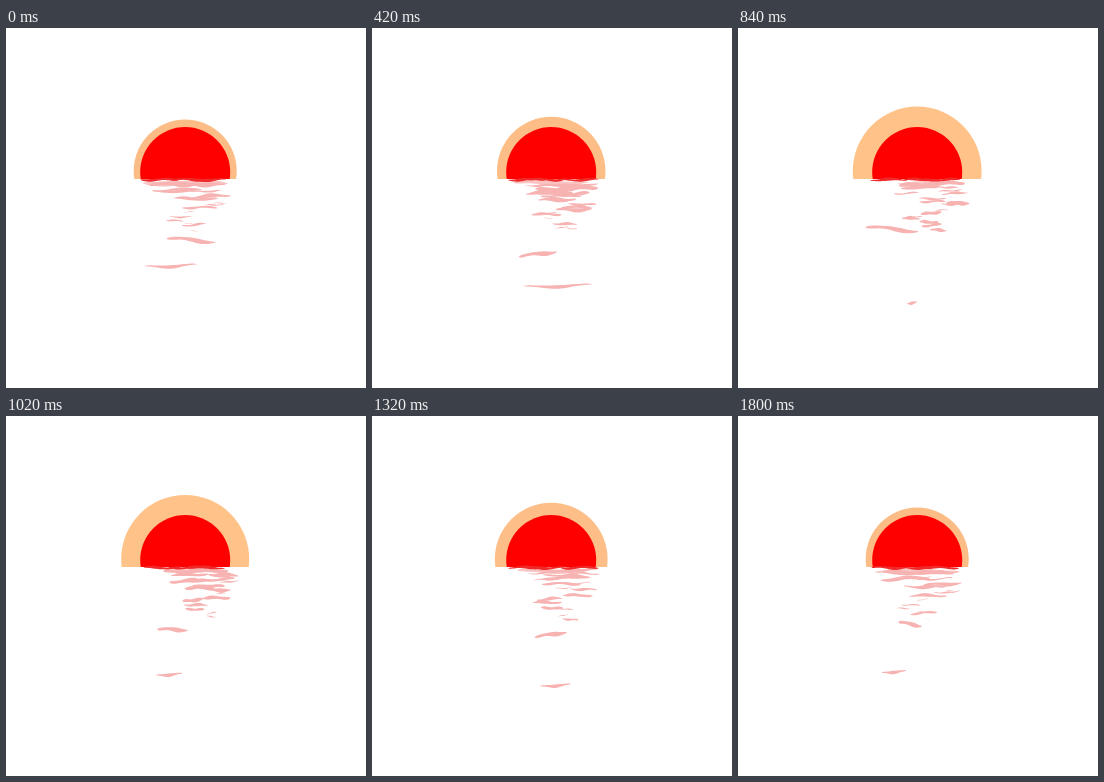
An HTML page with a canvas for the animation above (1830 ms loop, 360 by 360 pixels).

```html
<!DOCTYPE html>
<html lang="en">
<head>
<meta charset="utf-8">
<title>Sunset on water</title>
<style>
  html, body { margin: 0; width: 100%; height: 100%; overflow: hidden; background: #fff; }
  canvas { display: block; width: 360px; height: 360px; }
</style>
</head>
<body>
<canvas id="stage" width="360" height="360"></canvas>
<script>
const ctx = document.getElementById('stage').getContext('2d');
const LOOP = 1830, STEP = 30, TAU = Math.PI * 2;
const CX = 179.2, HORIZON = 151;
const PINK = '#f6b3b2', PALE = '#f9c3c2', RIPPLE = '#ee2a2a';
const RIPPLES = 18;

// Two stray glints wander over the open water: centre x, y, length
const times = [0, 180, 420, 840, 1170, 1500, 1800];
const far = [[185, 212, 50], [188, 203, 66], [166, 226, 39], [154, 201, 54],
  [177, 224, 12], [181, 212, 58], [172, 208, 24]];
const near = [[165, 238, 53], [152, 231, 38], [186, 258, 70], [174, 275, 10],
  [154, 245, 41], [219, 299, 19], [156, 256, 25]];

const lerp = (a, b, k) => a + (b - a) * k;
const rand = n => {
  const v = Math.sin(n * 127.1 + 4.7) * 43758.5453;
  return v - Math.floor(v);
};

function along(path, t) {
  let i = 0;
  while (i < times.length - 2 && t >= times[i + 1]) i++;
  const k = Math.min(1, (t - times[i]) / (times[i + 1] - times[i]));
  return path[i].map((v, j) => lerp(v, path[i + 1][j], k));
}

// A tapered ribbon centred on x, y with slightly uneven edges
function ribbon(x, y, length, thick, tilt, seed, color) {
  const n = 24, low = [];
  const wave = Math.min(1, length / 50);
  ctx.beginPath();
  for (let i = 0; i <= n; i++) {
    const u = i / n;
    const px = x + length * (u - 0.5);
    const py = y + tilt * (u - 0.5) + wave * Math.sin(u * 7 + seed * 2.3);
    const h = thick / 2 * Math.pow(Math.max(0, Math.sin(Math.PI * u)), 0.45)
      * (1 + 0.25 * Math.sin(u * 9 + seed * 1.7));
    ctx.lineTo(px, py - h);
    low.unshift([px, py + h]);
  }
  low.forEach(p => ctx.lineTo(...p));
  ctx.closePath();
  ctx.fillStyle = color;
  ctx.fill();
}

function dome(y, r, color) {
  ctx.fillStyle = color;
  ctx.beginPath();
  ctx.arc(CX, y, r, 0, TAU);
  ctx.fill();
}

function drawSun(glow) {
  ctx.save();
  ctx.beginPath();
  ctx.rect(0, 0, 360, HORIZON);
  ctx.clip();
  dome(143, lerp(51.5, 64.8, glow),
    `rgb(${lerp(252, 255, glow)},${lerp(188, 195, glow)},${lerp(134, 138, glow)})`);
  dome(144, 45, '#f00');
  ctx.restore();
}

// Ripples crowd the horizon and get shorter and sparser further down
function drawRipples(phase, glow) {
  ribbon(CX, 155, lerp(86, 40, glow), lerp(5, 2, glow), 0, phase, PALE);
  for (let i = 0; i < RIPPLES; i++) {
    const depth = i / (RIPPLES - 1);
    const turn = phase * (1 + i % 3) + rand(i) * TAU;
    const swell = 1 + 0.5 * Math.sin(turn) - depth * 0.5;
    const length = lerp(74, 26, Math.sqrt(depth)) * lerp(0.7, 1.1, rand(i + 40))
      * lerp(1, 0.72, glow) * Math.min(1, swell + 0.2);
    const room = Math.max(0, 88 - length);
    const x = CX + room * (rand(i + 80) - 0.5) + 6 * Math.sin(turn * 2) + 8 * glow;
    const y = 156 + 46 * Math.pow(depth, 1.4) + 1.5 * Math.cos(turn);
    ribbon(x, y, length, 3.2 * swell, 5 * (rand(i + 120) - 0.5), i + phase, PINK);
  }
}

function drawGlints(t, phase) {
  const [fx, fy, fl] = along(far, t), [nx, ny, nl] = along(near, t);
  ribbon(fx, fy, fl, 4, 5 * Math.cos(phase * 2 + 0.6), 1, PINK);
  ribbon(nx, ny, nl, 2.8, -2, 2, PINK);
}

// Darker red lapping at the foot of the sun
function drawLapping(phase) {
  for (let i = 0; i < 3; i++) {
    const x = CX + (i - 1) * 26 + 5 * Math.sin(phase * 2 + i * 2);
    ribbon(x, 151.7, 38, 2.6, 0, i + phase * 2, RIPPLE);
  }
}

function draw(t) {
  const phase = t / LOOP * TAU;
  const glow = Math.pow(Math.sin(phase / 2), 3.8);
  ctx.fillStyle = '#fff';
  ctx.fillRect(0, 0, 360, 360);
  drawSun(glow);
  drawRipples(phase, glow);
  drawGlints(t, phase);
  drawLapping(phase);
}

const start = performance.now();
function tick() {
  const t = (performance.now() - start) % LOOP;
  draw(Math.floor(t / STEP) * STEP);
  requestAnimationFrame(tick);
}
tick();
</script>
</body>
</html>
```
